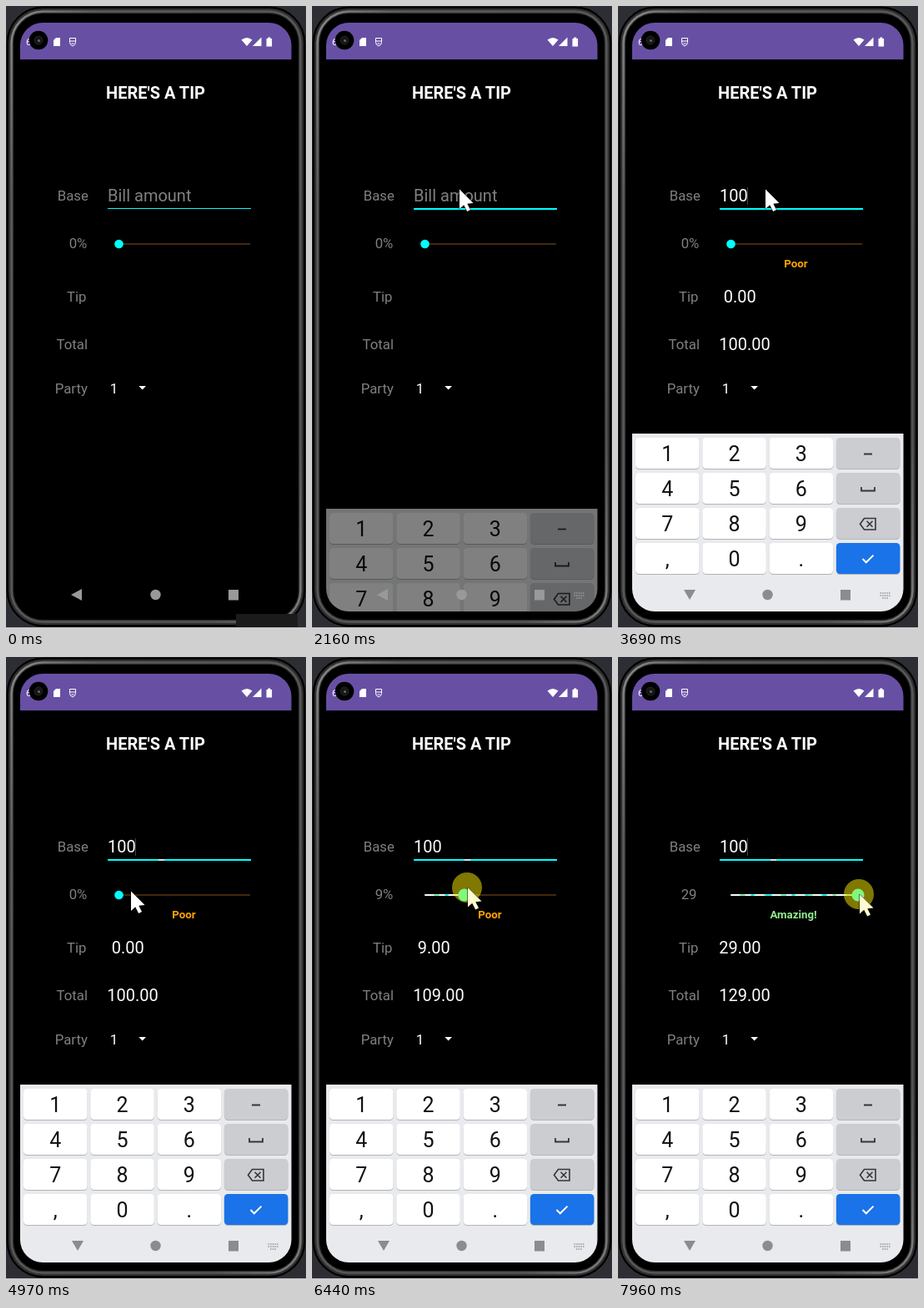
These frames come from a looping animation (360x746 px, 8000 ms). An HTML page:

```html
<!DOCTYPE html>
<html lang="en">
<head>
<meta charset="utf-8">
<title>Tip calculator</title>
<style>
  html, body { margin: 0; width: 100%; height: 100%; overflow: hidden; background: #2d2e33; }
  svg { display: block; width: 100vw; height: 100vh; font-family: Roboto, sans-serif; }
  .label { font-size: 16.8px; fill: #808080; }
  .value { font-size: 20px; fill: #fff; }
  .mid { text-anchor: middle; }
  .key { font-size: 25px; fill: #111; text-anchor: middle; }
</style>
</head>
<body>
<svg id="stage" viewBox="0 0 360 746">
  <defs>
    <clipPath id="screen"><rect x="17" y="20" width="325.500" height="705" rx="27"/></clipPath>
    <linearGradient id="rim" x2="1" y2="1">
      <stop offset="0" stop-color="#8a8a8a"/><stop offset=".15" stop-color="#5c5c5c"/>
      <stop offset=".85" stop-color="#545454"/><stop offset="1" stop-color="#808080"/>
    </linearGradient>
  </defs>

  <!-- phone body -->
  <rect width="360" height="746" fill="#2d2e33"/>
  <rect y="744" width="360" height="2" fill="#cfc9d0"/>
  <rect x="1.500" y="1.500" width="357" height="741" rx="43" fill="#050505" stroke="#000" stroke-width="2"/>
  <rect x="6" y="6" width="348" height="732" rx="38" fill="none" stroke="#303030" stroke-width="6"/>
  <rect x="6.500" y="6.500" width="347" height="731" rx="38" fill="none" stroke="url(#rim)" stroke-width="2.500"/>
  <rect x="10" y="10" width="340" height="724" rx="34" fill="#000"/>
  <rect id="patch" x="276" y="728" width="74" height="16" fill="#1b1b1c"/>

  <g clip-path="url(#screen)">
    <rect x="17" y="20" width="326" height="705"/>
    <rect x="17" y="20" width="326" height="44" fill="#6750a4"/>
    <g fill="#fff">
      <text x="24" y="47" font-size="11">6</text>
      <path d="M60 38h5v10h-8v-7z"/>
      <path d="M282.500 40.500q6.500-5 13 0l-6.500 7.500z"/>
      <path d="M296 48h10.500V37.500z"/>
      <path d="M312.500 39h1.800v-1.500h3V39h1.800v9.500h-6.600z"/>
    </g>
    <path d="M76.500 38.500h7v5q0 3-3.500 4.500q-3.500-1.500-3.500-4.500zM77 42h6M78.500 45h3" fill="none" stroke="#fff"/>
    <circle cx="39" cy="41" r="11.300"/>
    <circle cx="39" cy="41" r="5" fill="#161617" stroke="#222224"/>
    <circle cx="39.500" cy="41.500" r="1.500" fill="#66666a"/>

    <text x="179.500" y="111" class="mid" font-size="20" font-weight="700" fill="#fff">HERE'S A TIP</text>
    <g class="label">
      <text x="61.700" y="233">Base</text>
      <text id="percent" x="75.700" y="290"></text>
      <text x="73" y="354">Tip</text>
      <text x="60.500" y="411">Total</text>
      <text x="58.700" y="464">Party</text>
    </g>
    <text id="bill" class="value" x="122" y="234"></text>
    <path id="caret" d="M155.500 217v21" stroke="#444"/>
    <rect id="line" x="122" y="242" width="172" fill="#00ffff"/>
    <rect id="glint" x="183" y="242" width="7" height="2" fill="#d8e4e4"/>

    <path d="M135.500 285H293" stroke="#43290b" stroke-width="2"/>
    <g id="progress" stroke-width="2">
      <path stroke="#86efb0"/>
      <path stroke="#20eef0" stroke-dasharray="9 14 13 6"/>
      <path stroke="#f2fff8" stroke-dasharray="11 6 7 4 12 9"/>
    </g>
    <circle id="thumb" cy="285" fill="#00ffff"/>
    <text id="rating" class="mid" y="313" font-size="13.300" font-weight="700"></text>
    <text id="tip" class="value mid" x="146.300" y="355"></text>
    <text id="total" class="value" x="121.300" y="412"></text>
    <text class="mid" x="129.500" y="464" font-size="17" fill="#fff">1</text>
    <path d="M159.300 455h8.700l-4.350 4.500z" fill="#fff"/>

    <g id="keyboard"></g>
    <g fill="#999" id="nav">
      <path id="back"/>
      <circle cx="179.500" cy="705" r="6.200"/>
      <rect x="267" y="699" width="12" height="12.500"/>
    </g>
    <path id="toggle" d="M314.500 703h12M314.500 706h12M317 709h7" stroke="#999" stroke-width="1.500" stroke-dasharray="1.600 1"/>
  </g>

  <circle id="press" r="18" fill="#fff000" opacity=".5"/>
  <path id="pointer" d="M0 0V23.500L5.200 18.800L9.200 26.500L13 24.600L9.300 17.200L16.500 16.600Z" stroke="#000" stroke-width="1" paint-order="stroke"/>
</svg>
<script>
const LOOP = 8000;
const el = {};
document.querySelectorAll('[id]').forEach(e => { el[e.id] = e; });

const set = (e, attrs) => { for (const k in attrs) e.setAttribute(k, attrs[k]); };
const show = (e, on) => e.setAttribute('visibility', on ? 'visible' : 'hidden');
const write = (e, s) => { if (e.textContent !== s) e.textContent = s; };

// Bursts of movement: start, end, number of pictures
const bursts = [
  [520, 800, 5], [1060, 1260, 3], [1810, 2020, 4], [2160, 2360, 4],
  [2900, 2900, 1], [3230, 3230, 1], [3690, 3690, 1], [4550, 4970, 7],
  [5300, 6040, 12], [6120, 6440, 6], [6440, 6910, 8],
  [6980, 7260, 5], [7260, 7740, 8], [7820, 7960, 3]
];

// Pointer tip: time, x, y
const path = [
  [520, 345, 248], [800, 180.500, 225], [960, 180.500, 225], [1260, 177, 219.500],
  [4480, 177, 219.500], [4970, 150, 280.500], [5300, 150, 281], [6040, 160, 279],
  [6440, 187, 276], [6910, 225, 279], [7260, 261, 282], [7740, 282, 284], [7960, 290, 284]
];

const ratings = [
  [20, 'Amazing!', '#90ee90'], [15, 'Good', '#c0e060'],
  [10, 'Acceptable', '#e6c832'], [0, 'Poor', '#ffa500']
];

function buildKeyboard() {
  const rows = ['123-', '456_', '789<', ',0.+'];
  let out = '<rect x="17" y="512" width="326" height="310" fill="#e8eaed"/>';
  rows.forEach((row, r) => [...row].forEach((c, i) => {
    const x = 21 + i * 80.300, y = 517 + r * 42;
    const color = c === '+' ? '#1a73e8' : i === 3 ? '#cbcdd1' : '#fff';
    out += `<rect x="${x}" y="${y + 1}" width="76.500" height="37" rx="4.500" fill="#b2b4b8"/>
      <rect x="${x}" y="${y}" width="76.500" height="37" rx="4.500" fill="${color}"/>`;
    if (i < 3) out += `<text class="key" x="${x + 38.200}" y="${y + 28}">${c}</text>`;
  }));
  out += `<g fill="none" stroke="#33363a" stroke-width="1.800">
    <path d="M295 536.500h10"/><path d="M292 576v4.500h16v-4.500"/>
    <path d="M295.500 613.500h13.500v13.500h-13.500l-5-6.750zM298.500 616.800l7 7m0-7l-7 7" stroke-width="1.600"/>
    <path d="M293.500 662l4.300 4.300l8.700-8.700" stroke="#fff" stroke-width="2"/></g>`;
  el.keyboard.innerHTML = out;
}

function snap(t) {
  let at = 0;
  for (const [a, b, n] of bursts) {
    if (t < a) break;
    const step = (b - a) / (n - 1 || 1);
    at = t >= b ? b : a + Math.floor((t - a) / step + 1e-6) * step;
  }
  return at;
}

function pointerAt(t) {
  const i = path.findIndex(p => p[0] > t);
  if (i < 0) return path[path.length - 1].slice(1);
  if (i === 0) return path[0].slice(1);
  const [a, ax, ay] = path[i - 1], [b, bx, by] = path[i];
  let u = (t - a) / (b - a);
  if (t < 5000) u = u * u * (3 - 2 * u);
  return [ax + (bx - ax) * u, ay + (by - ay) * u];
}

function draw(now) {
  const t = snap(now);
  const [x, y] = pointerAt(t);
  const drag = t >= 5300;
  const pressed = drag || (t >= 1810 && t < 1950);
  const pct = drag ? Math.floor((x - 135.500) / 5.260) : 0;
  const digits = t < 2900 ? 0 : t < 3230 ? 1 : t < 3690 ? 2 : 3;
  const base = digits ? 10 ** (digits - 1) : 0;

  show(el.patch, t < 520);
  show(el.pointer, t >= 520);
  set(el.pointer, { transform: `translate(${x} ${y})`, fill: pressed ? '#fffbd0' : '#fff' });
  show(el.press, pressed);
  set(el.press, { cx: x - 1, cy: y });

  write(el.bill, digits ? String(base) : 'Bill amount');
  set(el.bill, { style: `fill:${digits ? '#fff' : '#808080'}` });
  show(el.caret, digits === 3 && (!drag || Math.floor(t / 500) % 2 === 1));
  set(el.line, { height: t >= 1880 ? 2 : 1 });
  show(el.glint, t >= 4550);

  const knob = 135.500 + pct * 5.260;
  write(el.percent, pct < 10 ? pct + '%' : String(pct));
  set(el.thumb, { cx: knob, r: drag ? 7.5 : 5.3 });
  show(el.progress, pct > 0);
  for (const e of el.progress.children) set(e, { d: `M135.500 285H${knob}` });

  const [, name, color] = ratings.find(r => pct >= r[0]);
  write(el.rating, digits ? name : '');
  set(el.rating, { fill: color, x: pct < 10 ? 213.5 : 210.5 });
  const tip = base * pct / 100;
  write(el.tip, digits ? tip.toFixed(2) : '');
  write(el.total, digits ? (base + tip).toFixed(2) : '');

  const u = Math.min(1, Math.max(0, (t - 2160) / 200));
  show(el.keyboard, t >= 2160);
  set(el.keyboard, { transform: `translate(0 ${90 * (1 - u) ** 2})`, opacity: 1 - 0.5 * (1 - u) ** 1.5 });
  set(el.nav, { fill: u > 0.5 ? '#8b8c8f' : '#999' });
  set(el.back, { d: u > 0.5 ? 'M79 699h14l-7 12z' : 'M78 705l13-7v14z' });
  show(el.toggle, t >= 2020);
}

function tick() {
  draw(performance.now() % LOOP);
  requestAnimationFrame(tick);
}

buildKeyboard();
tick();
</script>
</body>
</html>
```
